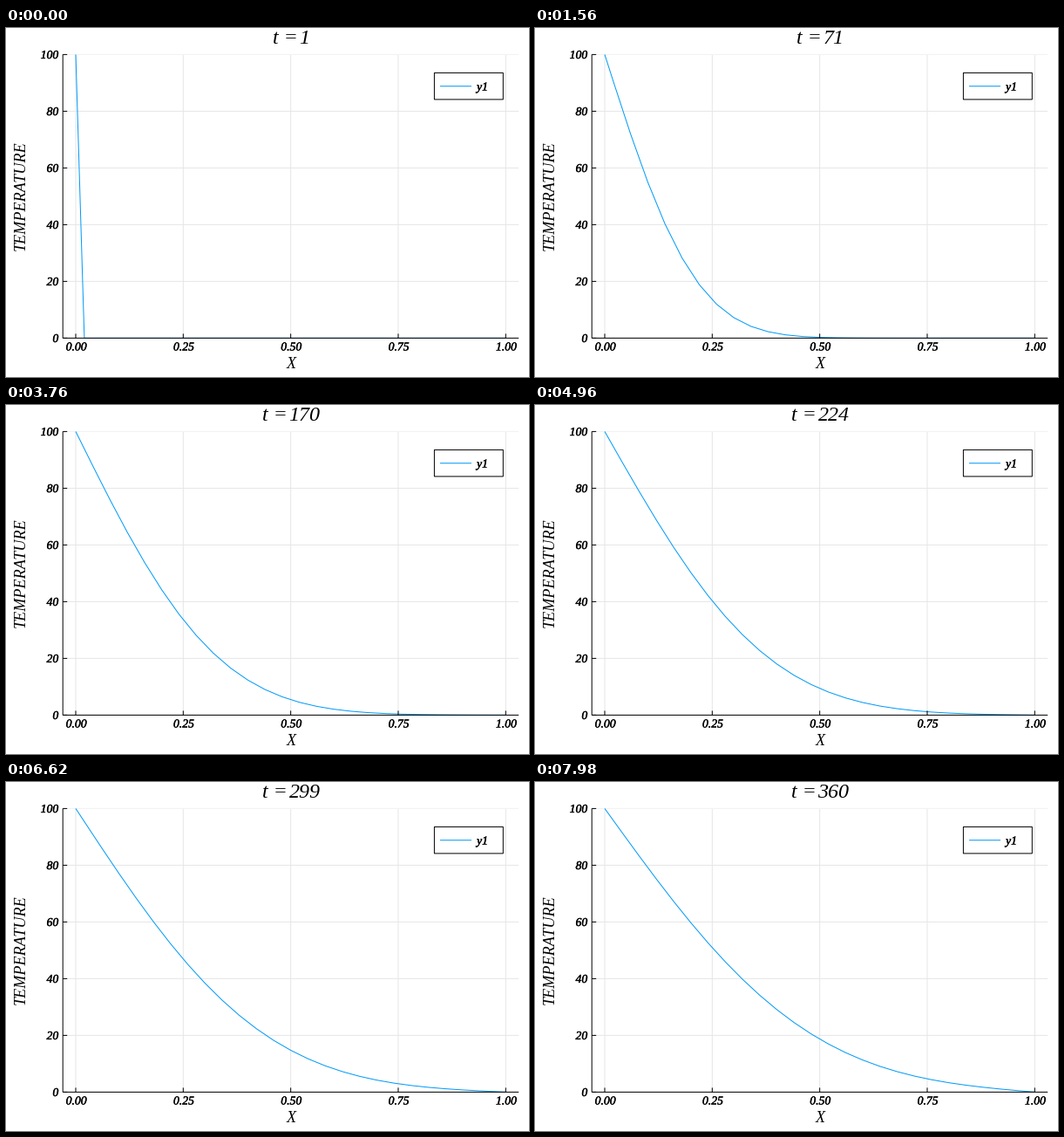
Recreate the animation shown at these times as a matplotlib script. Size 600 by 400 pixels, loop 8000 ms.

```python
import numpy as np
import matplotlib.pyplot as plt
from matplotlib.animation import FuncAnimation
from matplotlib.patches import Rectangle
from matplotlib.patheffects import withStroke

W, H, DPI = 600, 400, 100
LOOP, TICK = 8000, 20      # ms
STEPS = 360                # solver steps per loop
POINTS = 51
PX = 72 / DPI              # one pixel in points

LEFT, RIGHT, TOP, BOTTOM = 65.2, 588.2, 30.4, 355.4
BLUE, GRID = "#009af9", "#e6e6e6"
SMALL, MEDIUM, LARGE = 13.7, 18.1, 24   # text sizes in pixels
DIGIT = LARGE / 2          # advance of one title digit

plt.rcParams["font.family"] = "Liberation Serif"
plt.rcParams["font.style"] = "italic"


def to_x(x):
    return 80 + 493.3 * x


def to_y(temp):
    return BOTTOM - (BOTTOM - TOP) * temp / 100


def solve():
    """Explicit heat equation, r = 1/2, hot left end and cold right end."""
    u = np.zeros((STEPS, POINTS))
    u[:, 0] = 100
    for k in range(1, STEPS):
        u[k, 1:-1] = (u[k - 1, :-2] + u[k - 1, 2:]) / 2
    return u


fig = plt.figure(figsize=(W / DPI, H / DPI), dpi=DPI, facecolor="white")
ax = fig.add_axes([0, 0, 1, 1])
ax.set_xlim(0, W)
ax.set_ylim(H, 0)
ax.axis("off")


def line(xs, ys, color="black", z=2):
    return ax.plot(xs, ys, color=color, lw=PX, zorder=z, snap=False,
                   solid_capstyle="butt")[0]


def label(x, y, s, size, ha="center", weight=0.0, **kw):
    t = ax.text(x, y, s, fontsize=size * PX, ha=ha, va="baseline",
                color="black", **kw)
    if weight:
        t.set_path_effects([withStroke(linewidth=weight * PX,
                                       foreground="black")])
    return t


# grid, ticks and tick labels
for v in np.linspace(0, 1, 5):
    x = to_x(v)
    line([x, x], [TOP, BOTTOM], GRID, z=1)
    line([x, x], [BOTTOM, BOTTOM - 5], z=4)
    label(x + 0.7, 369.5, f"{v:.2f}", SMALL, weight=0.4)
for v in range(0, 101, 20):
    y = to_y(v)
    if v:
        line([LEFT, RIGHT], [y, y], "#f2f2f2" if v == 100 else GRID, z=1)
    line([LEFT, LEFT + 5], [y, y], z=4)
    label(60.3, y + 4.6, str(v), SMALL, "right", weight=0.4)

line([LEFT, LEFT], [TOP, BOTTOM], z=4)
line([LEFT, RIGHT], [BOTTOM, BOTTOM], z=4)

label(327, 389.5, "X", MEDIUM)
label(22, 192, "TEMPERATURE", MEDIUM, rotation=90, rotation_mode="anchor")

# legend
ax.add_patch(Rectangle((491.4, 51.4), 78.9, 30.5, fc="white", ec="black",
                       lw=PX, zorder=5, snap=False))
line([498, 534], [66.7, 66.7], BLUE, z=6)
label(540, 71.5, "y1", SMALL, "left", weight=0.4, zorder=6)

temps = solve()
curve = line(to_x(np.linspace(0, 1, POINTS)), to_y(temps[0]), BLUE, z=3)
prefix = label(0, 18, "t =", LARGE, "left")
count = label(0, 18, "1", LARGE, "left")


def update(i):
    k = min(int((i * TICK + 5) * STEPS / LOOP), STEPS - 1)
    curve.set_ydata(to_y(temps[k]))
    s = str(k + 1)
    shift = len(s) * DIGIT / 2
    prefix.set_x(312.5 - shift)
    count.set_x(342.5 - shift)
    count.set_text(s)
    return curve, prefix, count


anim = FuncAnimation(fig, update, frames=LOOP // TICK, interval=TICK,
                     repeat=True, repeat_delay=0)
plt.show()
```
